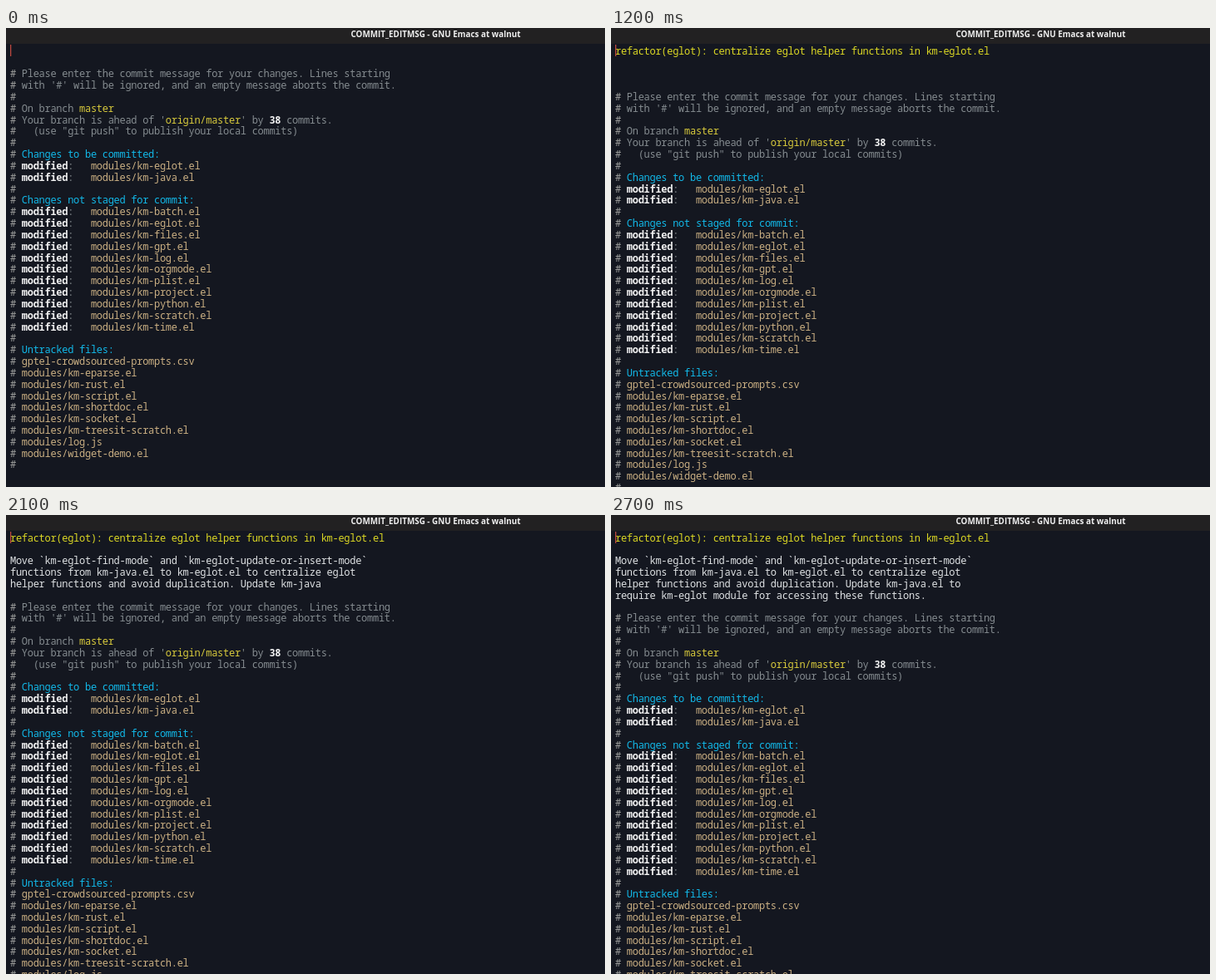
Write an HTML page with a canvas that moves like this. It is 720 by 552 pixels and loops after 2800 ms.

```html
<!DOCTYPE html>
<html lang="en">
<head>
<meta charset="utf-8">
<title>Commit message</title>
<style>
  html, body { margin: 0; height: 100%; overflow: hidden; background: #141720; }
  canvas { display: block; }
</style>
</head>
<body>
<canvas id="stage" width="720" height="552"></canvas>
<script>
const ctx = document.getElementById('stage').getContext('2d');
const LOOP = 2800, STEP = 100;
const LEFT = 5, TOP = 20.2, COL = 6.92, ROW = 13.83, BASE = 11.4;
const GREY = '#858c90', HASH = '#a0a19f', CYAN = '#12b9e9', TAN = '#cbb083',
      YELLOW = '#d9cb3c', HEAD = '#dcd824', WHITE = '#f2f2f2', BODY = '#dfe2e4';

const message = [
  'refactor(eglot): centralize eglot helper functions in km-eglot.el',
  '',
  'Move `km-eglot-find-mode` and `km-eglot-update-or-insert-mode`',
  'functions from km-java.el to km-eglot.el to centralize eglot',
  'helper functions and avoid duplication. Update km-java.el to',
  'require km-eglot module for accessing these functions.'
].join('\n');

// A comment line is a list of [text, colour, bold] parts after the hash.
const note = text => [[text, GREY]];
const heading = text => [[text, CYAN]];
const modified = name => [['modified', WHITE, true], [':   ', GREY], [`modules/km-${name}.el`, TAN]];
const untracked = path => [[path, TAN]];

const comments = [
  note('Please enter the commit message for your changes. Lines starting'),
  note("with '#' will be ignored, and an empty message aborts the commit."),
  [],
  [['On branch ', GREY], ['master', YELLOW]],
  [["Your branch is ahead of '", GREY], ['origin/master', YELLOW], ["' by ", GREY],
   ['38', WHITE, true], [' commits.', GREY]],
  note('  (use "git push" to publish your local commits)'),
  [],
  heading('Changes to be committed:'),
  ...['eglot', 'java'].map(modified),
  [],
  heading('Changes not staged for commit:'),
  ...['batch', 'eglot', 'files', 'gpt', 'log', 'orgmode', 'plist', 'project',
      'python', 'scratch', 'time'].map(modified),
  [],
  heading('Untracked files:'),
  ...['gptel-crowdsourced-prompts.csv', 'modules/km-eparse.el', 'modules/km-rust.el',
      'modules/km-script.el', 'modules/km-shortdoc.el', 'modules/km-socket.el',
      'modules/km-treesit-scratch.el', 'modules/log.js', 'modules/widget-demo.el'].map(untracked),
  []
];

// [time, characters received]
const stream = [[1000, 0], [1100, 33], [1200, 67], [1600, 139], [2100, 245], [2400, message.length]];

function received(t) {
  for (let i = 1; i < stream.length; i++) {
    const [t0, n0] = stream[i - 1], [t1, n1] = stream[i];
    if (t < t1) return Math.round(n0 + (n1 - n0) * Math.max(0, (t - t0) / (t1 - t0)));
  }
  return message.length;
}

function write(text, row, col, color, bold) {
  ctx.font = `${bold ? 'bold ' : ''}12px "Noto Sans Mono", "DejaVu Sans Mono", monospace`;
  ctx.fillStyle = color;
  [...text].forEach((ch, i) => ctx.fillText(ch, LEFT + (col + i) * COL, TOP + row * ROW + BASE));
}

function drawPulse(lines, t) {
  if (t < 2400 || t >= 2700) return;
  ctx.globalAlpha = 0.85 - (t - 2400) * 0.0032;
  ctx.fillStyle = '#aaaa33';
  lines.forEach((line, row) => {
    const from = row ? 0 : 2;
    const to = line.length + (row < lines.length - 1 ? 1 : 0);
    const y = Math.round(TOP + row * ROW);
    ctx.fillRect(LEFT + from * COL, y, (to - from) * COL, Math.round(TOP + (row + 1) * ROW) - y);
  });
  ctx.globalAlpha = 1;
}

function drawTitle() {
  ctx.fillStyle = '#222122';
  ctx.fillRect(0, 0, 720, 19);
  ctx.font = 'bold 9.9px "Open Sans", "Noto Sans", sans-serif';
  ctx.fillStyle = '#efefef';
  ctx.textAlign = 'center';
  ctx.fillText('COMMIT_EDITMSG - GNU Emacs at walnut', 516.5, 10.5);
  ctx.textAlign = 'left';
}

function draw(t) {
  const lines = message.slice(0, received(t)).split('\n');
  ctx.fillStyle = '#141720';
  ctx.fillRect(0, 0, 720, 552);
  drawTitle();
  drawPulse(lines, t);
  lines.forEach((line, row) => write(line, row, 0, row ? BODY : HEAD));
  comments.forEach((parts, i) => {
    const row = lines.length + 1 + i;
    let col = 2;
    write('#', row, 0, HASH);
    for (const [text, color, bold] of parts) {
      write(text, row, col, color, bold);
      col += text.length;
    }
  });
  ctx.fillStyle = '#b9483f';
  ctx.fillRect(5, 20, 1.3, 14);
}

const start = performance.now();
function tick() {
  const t = (performance.now() - start) % LOOP;
  draw(Math.floor(t / STEP) * STEP);
  requestAnimationFrame(tick);
}
tick();
</script>
</body>
</html>
```
